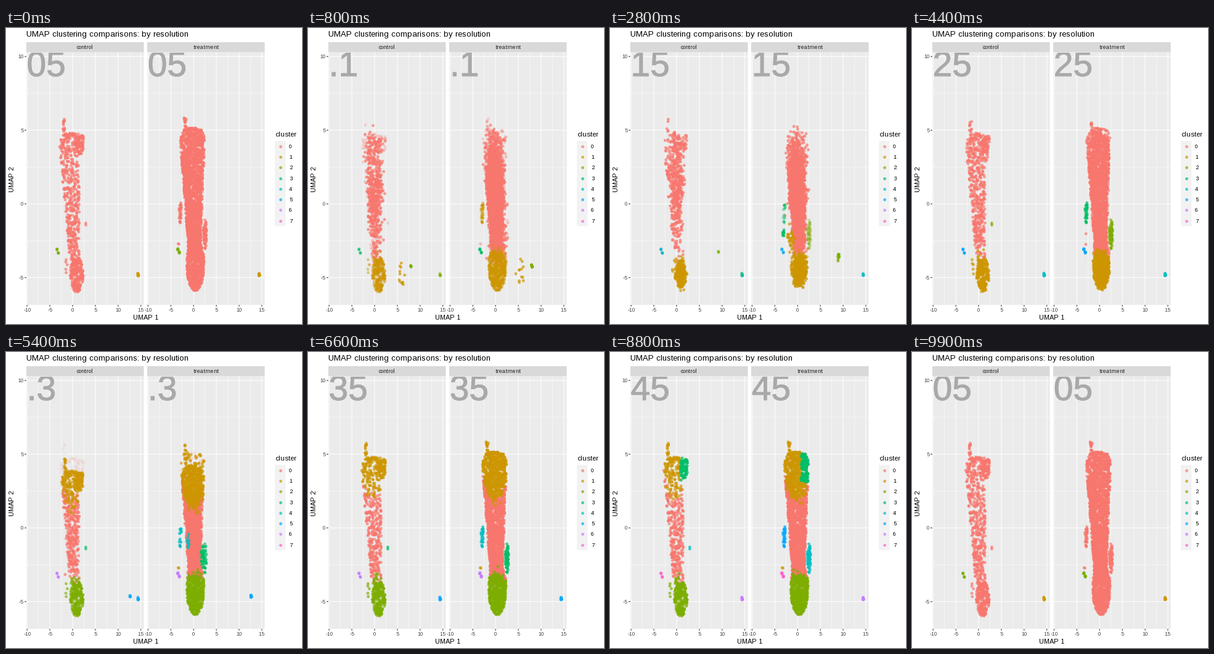
A matplotlib script that plays this animation: 480 px wide and 480 px high, repeating every 10 s.

```python
import numpy as np
import matplotlib.pyplot as plt
from matplotlib.animation import FuncAnimation
from matplotlib.colors import to_rgb
from matplotlib.patches import Rectangle
from matplotlib.patheffects import withStroke

plt.rcParams["font.family"] = "Liberation Sans"
plt.rcParams["text.hinting_factor"] = 1
rng = np.random.default_rng(7)

SIZE, DPI = 480, 72          # at 72 dpi one point equals one pixel
TOP, BOTTOM, WIDTH = 39.5, 449, 190.5
PANELS = [(33, 108, "control"), (229, 304.2, "treatment")]
UX, UY, Y0 = 7.38, 23.9, 285.2
COLORS = [to_rgb(c) for c in (
    "#F8766D", "#CD9600", "#7CAE00", "#00BE67",
    "#00BFC4", "#00A9FF", "#C77CFF", "#FF61CC")]
ALPHA, DOT = 0.7, 4.8 ** 2
STEPS = 9
LABELS = [f"{0.05 * (i + 1):.2f}".rstrip("0") for i in range(STEPS)]
MARKS = np.linspace(1, 99, STEPS + 1).round()

# Resolution step at which each zone splits off, in cluster order
BIRTH = {"mid": 0, "high": 5, "low": 1, "corner": 8,
         "right": 3, "left": 3, "far": 0, "mini": 0}
PARENT = {"corner": "high", "left": "low"}


def box(n, x0, x1, y0, y1):
    return rng.uniform((x0, y0), (x1, y1), (n, 2))


def ellipse(n, cx, cy, rx, ry):
    r, a = np.sqrt(rng.random(n)), rng.uniform(0, 2 * np.pi, n)
    return np.column_stack([cx + rx * r * np.cos(a), cy + ry * r * np.sin(a)])


def wedge(n, y0, y1, left, right, skew):
    """Band with sloping edges and a rounded top, denser upwards."""
    y = y1 - (y1 - y0) * rng.random(n) ** skew
    taper = (1 - np.clip((y - y1 + 1.2) / 1.2, 0, 1) ** 2) ** 0.25
    lo, hi = np.polyval(left, y), np.polyval(right, y)
    return np.column_stack([(lo + (hi - lo) * rng.random(n)) * taper, y])


def body(pts):
    """Label the points of the main column by height, with fuzzy borders."""
    return [("body", pts)]


def specks(n_mini):
    return [("far", box(12, 14.33, 14.5, -4.9, -4.7)),
            ("mini", box(n_mini // 2, -3.48, -3.36, -3.16, -3.04)),
            ("mini", box(n_mini // 2, -3.2, -3.08, -3.36, -3.26))]


CONTROL = [
    ("body", wedge(480, -3.8, 4.8, (-0.3, -1.75), (0, 1.5), 1.25)),
    ("body", ellipse(75, 1.6, 4.1, 0.95, 0.75)),
    ("body", ellipse(250, 0.9, -4.8, 1.45, 1.2)),
    ("body", box(5, -1.8, -1.0, -5.0, -3.3)),
    ("right", box(2, 2.7, 2.95, -1.9, -1.2)),
    ("high", box(14, -2.15, -1.65, 4.9, 5.9)),
] + specks(6)

TREATMENT = [
    ("body", wedge(2100, -3.6, 5.15, (-0.25, -1.9), (0.13, 1.9), 1.0)),
    ("body", ellipse(700, 0.4, -4.1, 1.95, 1.8)),
    ("left", ellipse(32, -2.95, -0.5, 0.28, 0.85)),
    ("right", ellipse(60, 2.55, -2.05, 0.42, 1.0)),
    ("high", box(18, -2.1, -1.6, 4.9, 5.85)),
    ("high", box(2, -3.5, -3.1, -2.9, -2.7)),
] + specks(12)


def zones_of(names, pts):
    """Cut the main column by height, with borders that vary per step."""
    x, y = pts.T
    noise = rng.normal(0, 0.3, len(y))
    cut = np.select([y + noise < -3.5, (x > 0.8) & (y > 3.1),
                     y + noise > 2.1 + 0.18 * x ** 2],
                    ["low", "corner", "high"], "mid")
    return np.where(names == "body", cut, names)


def number(zone, step):
    """Cluster number of a zone: its rank among those already split off."""
    while BIRTH[zone] > step:
        zone = PARENT.get(zone, "mid")
    return [z for z in BIRTH if BIRTH[z] <= step].index(zone)


def split(parts):
    """Points of every cluster at every step."""
    pts = np.vstack([p for _, p in parts])
    names = np.concatenate([[name] * len(p) for name, p in parts])
    order = rng.permutation(len(pts))
    pts, names = pts[order], names[order]
    steps = []
    for step in range(STEPS):
        c = np.array([number(z, step) for z in zones_of(names, pts)])
        steps.append([pts[c == g] for g in range(len(COLORS))])
    return steps


STATES = [split(CONTROL), split(TREATMENT)]


def phase(frame):
    """Current step, next step and progress between them."""
    if not MARKS[0] <= frame < MARKS[-1]:
        return 0, 1, 0.0
    k = int(np.searchsorted(MARKS, frame, side="right")) - 1
    return k, (k + 1) % STEPS, (frame - MARKS[k]) / (MARKS[k + 1] - MARKS[k])


def tween(now, then, p):
    """Pair rows in order inside each cluster; spare rows fade."""
    xy, rgba = [], []
    for color, a, b in zip(COLORS, now, then):
        n = min(len(a), len(b))
        for pts, alpha in ((a[:n] + (b[:n] - a[:n]) * p, 1),
                           (a[n:], 1 - p), (b[n:], p)):
            xy.append(pts)
            rgba += [(*color, ALPHA * alpha)] * len(pts)
    return np.vstack(xy), rgba


fig = plt.figure(figsize=(SIZE / DPI, SIZE / DPI), dpi=DPI, facecolor="white")
ax = fig.add_axes([0, 0, 1, 1])
ax.set(xlim=(0, SIZE), ylim=(SIZE, 0))
ax.axis("off")


def text(x, y, s, size, color="black", ha="left", **kw):
    return ax.text(x, y, s, fontsize=size, color=color, ha=ha, va="baseline", **kw)


def rect(x, y, w, h, color):
    return ax.add_patch(Rectangle((x, y), w, h, fc=color, ec="none", lw=0, snap=False))


def line(xs, ys, width, color="white"):
    ax.plot(xs, ys, color=color, lw=width, solid_capstyle="butt", zorder=1.5, snap=False)


text(33, 14, "UMAP clustering comparisons: by resolution", 13.2)
text(226, 473, "UMAP 1", 11, ha="center")
text(13.2, 244.5, "UMAP 2", 11, ha="center", rotation=90, rotation_mode="anchor")

dots, marks = [], []
for left, zero, name in PANELS:
    right = left + WIDTH
    rect(left, 23, WIDTH, TOP - 23, "#D9D9D9")
    text(left + WIDTH / 2, 34.2, name, 8.8, "#1A1A1A", "center")
    panel = rect(left, TOP, WIDTH, BOTTOM - TOP, "#EBEBEB")
    for v in np.arange(-7.5, 15, 5):
        line([zero + v * UX] * 2, [TOP, BOTTOM], 0.53)
    for v in (-2.5, 2.5, 7.5):
        line([left, right], [Y0 - v * UY] * 2, 0.53)
    for v in range(-10, 16, 5):
        x = zero + v * UX
        line([x, x], [TOP, BOTTOM], 1.07)
        line([x, x], [BOTTOM, BOTTOM + 2.75], 1.07, "#333333")
        text(x, 460, str(v), 8.8, "#4D4D4D", "center")
    for v in range(-5, 11, 5):
        line([left, right], [Y0 - v * UY] * 2, 1.07)
    mark = text(zero - 9 * UX, 78, "", 56.9, "#A9A9A9", "center", zorder=2,
                path_effects=[withStroke(linewidth=1, foreground="#A9A9A9")])
    mark.set_clip_path(panel)
    mark.set_clip_on(True)
    marks.append(mark)
    dots.append(ax.scatter([], [], s=DOT, linewidths=0, zorder=3))

for v in range(-5, 11, 5):
    y = Y0 - v * UY
    line([30.2, 33], [y, y], 1.07, "#333333")
    text(28.3, y + 3.1, str(v), 8.8, "#4D4D4D", "right")

text(436, 176, "cluster", 11)
rect(436, 183, 17.28, 8 * 17.28, "#F2F2F2")
for g, color in enumerate(COLORS):
    y = 191.7 + 17.28 * g
    ax.scatter([444.7], [y], s=DOT, color=[color], alpha=ALPHA, linewidths=0, zorder=3)
    text(459, y + 3.1, str(g), 8.8)


def draw(frame):
    k, nxt, p = phase(frame)
    label = LABELS[k if p < 0.5 else nxt]
    for (_, zero, _), states, dot, mark in zip(PANELS, STATES, dots, marks):
        xy, rgba = tween(states[k], states[nxt], p)
        dot.set_offsets(xy * [UX, -UY] + [zero, Y0])
        dot.set_facecolors(rgba)
        mark.set_text(label)
    return dots + marks


anim = FuncAnimation(fig, draw, frames=100, interval=100, repeat=True)
plt.show()
```
